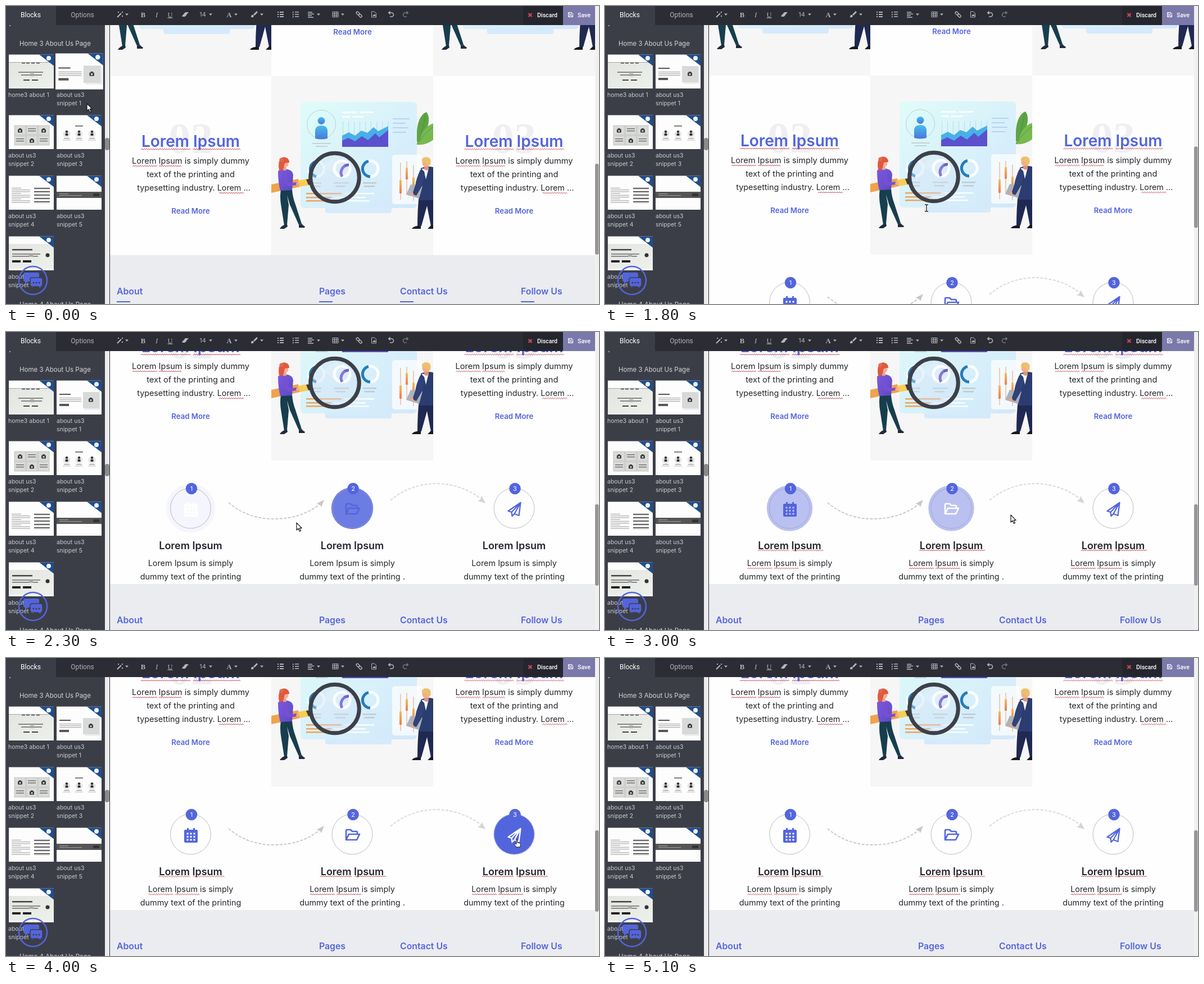
Write an HTML page that moves like this. It is 1055x531 px and loops after 5.4 s.

```html
<!DOCTYPE html>
<html lang="en">
<head>
<meta charset="utf-8">
<title>Snippet editor</title>
<style>
html,body{margin:0;width:100%;height:100%;overflow:hidden;background:#fff}
svg{display:block;font-family:Inter,"Open Sans",sans-serif}
.ui{font-family:Roboto,Inter,sans-serif}
</style>
</head>
<body>
<svg id="stage" width="1055" height="531" viewBox="0 0 1055 531"></svg>
<script>
const BLUE = '#5365dd', SIDE = '#3c3e47', BAR = '#2b2c34', INK = '#25262c', LOOP = 5400;
const stage = document.getElementById('stage');

// Markup helpers
const rect = (x, y, w, h, fill, more = '') => `<rect x="${x}" y="${y}" width="${w}" height="${h}" fill="${fill}" ${more}/>`;
const disc = (x, y, r, fill, more = '') => `<circle cx="${x}" cy="${y}" r="${r}" fill="${fill}" ${more}/>`;
const shape = (d, fill, more = '') => `<path d="${d}" fill="${fill}" ${more}/>`;
const line = (d, color, w = 1, more = '') => `<path d="${d}" fill="none" stroke="${color}" stroke-width="${w}" ${more}/>`;
const group = (body, more = '') => `<g ${more}>${body}</g>`;
const at = (x, y, body, more = '') => group(body, `transform="translate(${x} ${y})" ${more}`);
const text = (x, y, s, size, fill = INK, more = '') => `<text x="${x}" y="${y}" font-size="${size}" fill="${fill}" ${more}>${s}</text>`;
const mid = (x, y, s, size, fill = INK, weight = 400, more = '') => text(x, y, s, size, fill, `text-anchor="middle" font-weight="${weight}" ${more}`);
const wave = (x1, x2, y) => line(`M${x1} ${y}` + 'l2 -1.8 2 1.8'.repeat(Math.round((x2 - x1) / 4)), '#c8444f', 1);
const bars = (list, fill, h = 2) => list.map(([x, y, w]) => rect(x, y, w, h, fill)).join('');

const defs = `<defs>
<linearGradient id="panel" x1="0" y1="0" x2="1" y2="1"><stop stop-color="#dffcf9"/><stop offset="1" stop-color="#d2e7fb"/></linearGradient>
<linearGradient id="user" x1="0" y1="0" x2="0" y2="1"><stop stop-color="#49bdec"/><stop offset="1" stop-color="#4a78dd"/></linearGradient>
<linearGradient id="warm" x1="0" y1="0" x2="0" y2="1"><stop stop-color="#f6bd5a"/><stop offset="1" stop-color="#ee7a4e"/></linearGradient>
<linearGradient id="shirt" x1="0" y1="0" x2="1" y2="1"><stop stop-color="#7f58dc"/><stop offset="1" stop-color="#5a49c4"/></linearGradient>
<linearGradient id="soft" x1="0" y1="0" x2="1" y2="1"><stop stop-color="#e3e5e1"/><stop offset="1" stop-color="#eef0ec"/></linearGradient>
<clipPath id="cell"><rect x="472" y="125" width="288" height="319"/></clipPath>
<clipPath id="view"><rect x="185" y="34" width="863" height="497"/></clipPath>
<clipPath id="list"><rect y="34" width="176" height="497"/></clipPath>
</defs>`;

// Illustration
const gauge = (x, y, arc, color) => disc(x, y, 14, 'none', 'stroke="#fafdff" stroke-width="5"') +
  line(`M${x} ${y + 14}A14 14 0 0 1 ${x + arc[0]} ${y + arc[1]}`, color, 5);
const candle = (x, y1, y2, b, h) => rect(x - .5, y1, 1, y2 - y1, '#e8a070') + rect(x - 2, b, 4, h, 'url(#warm)', 'rx="1"');
const dashboard = rect(568, 350, 118, 19, '#d5eafb', 'rx="4"') + rect(524, 171, 207, 189, 'url(#panel)', 'rx="7"') +
  disc(561, 211, 25.5, 'none', 'stroke="#bccfd2"') + disc(561, 204.5, 6.5, 'url(#user)') +
  shape('M550 236V223q0 -10 11 -10t11 10v13q-11 3 -22 0z', 'url(#user)') +
  bars([[545, 244, 33], [551, 249, 21]], '#c5d1d5') +
  bars([[598, 188, 27], [629, 188, 26], [598, 196, 14], [616, 196, 20]], '#fbfeff', 3) +
  [...Array(9)].map((_, i) => rect(599 + i * 10, 206, 1, 44, '#b4ddec')).join('') +
  shape('M598 231l12 -6 11 6 11 -9 11 4 11 -10 8 7 18 -9v37h-82z', '#48b0e8') +
  shape('M598 240l11 -5 12 6 12 -9 11 7 13 -12 7 7 16 -13v30h-82z', '#5b50ce') +
  bars([[688, 200, 30], [688, 208, 23], [688, 216, 28], [688, 224, 24]], '#b9d2f6') +
  gauge(552, 290, [3, -13.6], '#2783c4') + gauge(648, 290, [-3, -13.6], '#247dbd') +
  bars([[540, 314, 21], [543, 320, 17], [583, 314, 27], [586, 320, 18], [635, 314, 24], [637, 320, 19]], '#bfcbd2', 2.5) +
  bars([[534, 333, 63], [534, 340, 45], [534, 346, 57]], '#f0a15c', 2.5) +
  bars([[602, 333, 53], [583, 340, 57], [596, 346, 50]], '#fafdff', 2.5);
const plant = shape('M731 243C729 214 735 194 748 189C758 201 749 229 731 243z', '#5da445') +
  shape('M731 247C739 223 749 211 765 208L763 236Q749 249 731 247z', '#78b94f') +
  line('M731 247Q741 230 746 193M731 247Q744 226 762 214', '#448c3c', .8);
const woman = shape('M472 318l48 -10 3 14 -51 11z', '#f0a34c') + shape('M519 311l17 -3 4 11 -17 3z', '#f8cc55') +
  shape('M534 309l6 -1 3 9 -5 2z', '#393b42') +
  shape('M489 327h20q1 14 6 27l11 34 -5 2 -16 -36 -5 -17 3 17 -3 36 -5 1 -6 -38q-2 -13 0 -26z', '#173e4e') +
  shape('M495 390l5 -1 1 4 -6 4h-8q2 -4 8 -7zM521 390l5 -2q3 4 6 5l-1 2h-10z', '#222a3d') +
  shape('M484 294q8 -5 17 -3 9 2 10 10l-2 27 -21 1q-4 -14 -4 -35z', 'url(#shirt)') +
  shape('M500 299q5 7 1 13l9 3 7 -1v5l-14 2q-9 -3 -10 -9z', '#7650d2') + disc(519, 317, 2.8, '#f3ab8e') +
  shape('M493 285h5l1 8h-6z', '#f1a184') + disc(497, 282, 5.3, '#f4b194') +
  shape('M486 293q-3 -15 3 -21 3 -4 9 -2 6 2 6 9l-8 1 -2 9q-3 5 -8 4z', '#df593f') + disc(490, 274, 3.6, '#e8684a');
const man = rect(687, 265, 54, 88, '#fff', 'rx="5" opacity=".72"') + candle(702, 279, 345, 310, 24) + candle(713, 277, 336, 288, 21) + candle(725, 284, 347, 305, 26) +
  shape('M735 335h27l1 57h-7l-7 -36 -10 36h-7q0 -30 3 -57z', '#1f2951') +
  shape('M731 392h7v5h-16q2 -4 9 -5zM756 391h6v6h-12z', '#17191f') +
  shape('M738 289q13 -6 27 0v57h-31z', '#2b3c70') + shape('M739 290l5 5 3 14 5 -20z', '#f4f6f8') +
  shape('M720 318l21 3 -6 22 -23 -7z', '#adb2ba') + shape('M737 292q-7 15 -9 28l-5 15 7 3 10 -17 5 -20z', '#304277') +
  disc(722, 335, 3, '#efa386') + shape('M744 282h8v10q-5 2 -8 -1z', '#df9275') + disc(747, 280, 6.5, '#f1ad8d') +
  shape('M740 277q-1 -8 8 -8 10 1 7 13l-4 4 -3 -7z', '#edc06c');
const lens = disc(585, 305.5, 42, '#d3e2f6', 'opacity=".4"') + gauge(598, 290, [12, -7], '#745fd0') +
  shape('M563 287q10 -15 27 -19l24 32 -8 9z', '#fff', 'opacity=".15"') +
  disc(585, 305.5, 43.3, 'none', 'stroke="#3d4048" stroke-width="7"');
const art = group(rect(472, 125, 288, 319, '#f6f6f6') + plant + dashboard + man + lens + woman, 'id="art" clip-path="url(#cell)"');
const artCopy = dx => `<use href="#art" x="${dx}" y="-319"/>`;

// Page
const readMore = (x, y) => mid(x, y, 'Read More', 13.2, BLUE, 600);
const article = (dx, n) => at(dx, 0,
  mid(328.5, 262, n, 79, '#efeff3', 700, 'font-family="Liberation Serif,serif"') +
  mid(328.5, 251, 'Lorem Ipsum', 28, BLUE, 600) + wave(240, 326, 256) + wave(333, 417, 256) +
  mid(328.5, 281, 'Lorem Ipsum is simply dummy', 14.6) + wave(225, 267, 286) + wave(272, 313, 286) +
  mid(328.5, 305, 'text of the printing and', 14.6) +
  mid(334, 329, 'typesetting industry. Lorem ...', 14.3) + wave(379, 421, 334) + readMore(328.5, 370));
const rows = rect(185, -200, 863, 1200, '#fefefe') + art + artCopy(-288) + artCopy(288) + readMore(616.5, 51) + article(0, '02') + article(575.5, '03');

const icons = [
  shape('M-12 -7q0 -2 2 -2h3v-3h3v3h8v-3h3v3h3q2 0 2 2v19q0 2 -2 2h-20q-2 0 -2 -2z', 'currentColor') +
    [-7.5, -1.5, 4.5].map(x => [-3.5, 2, 7.5].map(y => rect(x, y, 3, 3, 'var(--back)')).join('')).join(''),
  line('M-11.5 9V-7q0 -2 2 -2h6l3 3h7q2 0 2 2v3M-11.5 9l5 -10h19l-5 10z', 'currentColor', 2.6, 'stroke-linejoin="round"'),
  line('M11 -11L-11 4l6 2 1 7 4 -4 8 3zM11 -11L-5 6M11 -11L0 9', 'currentColor', 2.3, 'stroke-linejoin="round"')
];
const step = (cx, i) => at(cx, 314,
  disc(0, 0, 36, '#fefefe', 'stroke="#c6c6ca"') + disc(0, 0, 36, BLUE, `id="fill${i}"`) +
  disc(0, 0, 35.5, 'none', 'stroke="#c6c6ca" stroke-width=".6" opacity=".6"') +
  at(.5, 1, icons[i], `id="icon${i}"`) + disc(1.5, -35, 10.3, BLUE) + mid(1.5, -31, i + 1, 11, '#fff') +
  mid(0, 73, 'Lorem Ipsum', 18, INK, 600) + mid(0, 103, 'Lorem Ipsum is simply', 14.4) +
  mid(0, 127, 'dummy text of the printing' + (i === 1 ? ' .' : ''), 14.4) +
  group(wave(-57, -1, 76) + wave(4, 58, 76) + wave(-75, -33, 108) + wave(-28, 14, 108), 'class="spell"'));
const steps = at(0, 215, rect(185, 229, 863, 220, '#fefefe') +
  line('M396 304Q430 333 476 333Q526 333 559 306', '#cbcbcd', 2, 'stroke-dasharray="5 2.5"') + shape('M566 299l-5 13 -3 -5 -6 -1z', '#c8c8ca') +
  line('M684 300Q718 271 765 270Q812 271 846 298', '#dadadc', 2, 'stroke-dasharray="5 2.5"') + shape('M853 305l-14 -4 6 -3 1 -6z', '#d4d4d6') +
  [328.5, 616, 904].map(step).join(''), 'id="steps"');
const footer = group(rect(185, 444, 863, 300, '#ebecf0') +
  [[197, 'About'], [557, 'Pages'], [701, 'Contact Us'], [916, 'Follow Us']].map(([x, s]) =>
    text(x, 514, s, 15.8, BLUE, 'font-weight="600"') + rect(x, 526, 24, 2, BLUE)).join(''), 'id="footer"');
const dropZone = rect(185, 432, 863, 24, '#b9bdd8', 'id="zone" fill-opacity=".45" stroke="#a9aec0" stroke-width="1.5" stroke-dasharray="6 4"');

// Sidebar thumbnails, each 80 by 60
const camera = (x, y) => rect(x - 4, y - 2.5, 8, 6, '#3d3d3d', 'rx="1"') + rect(x - 2, y - 4, 4, 2, '#3d3d3d') + disc(x, y + .5, 1.6, '#ddd');
const person = x => disc(x, 33, 6.5, '#e6e6e6') + disc(x, 29, 2.2, '#333') + rect(x - 2.5, 32, 5, 4, '#333', 'rx="1"') +
  bars([[x - 5, 40.5, 10]], '#777', 1) + bars([[x - 7, 43.5, 14]], '#aaa', .8);
const thumbs = [
  rect(0, 13, 80, 47, 'url(#soft)') + rect(0, 13, 80, 1, '#a5a5a5') + bars([[23, 14, 6], [31, 14, 6], [40, 14, 6], [49, 14, 6]], '#555', 1.5) +
    bars([[17, 30, 44], [22, 35, 37]], '#888', 2) + rect(38, 33, 7, 5, '#aaa') + bars([[26, 44, 11], [41, 44, 11]], '#444'),
  bars([[5, 23, 20]], '#555') + bars([[5, 30, 39], [5, 33, 39], [5, 36, 39]], '#aaa', 1.2) + rect(5, 41, 17, 4, '#555') +
    rect(50, 23, 29, 29, '#eee') + rect(47, 20, 29, 29, '#d8dada') + camera(61, 34),
  [0, 1, 2].map(i => [0, 1].map(j => rect(10 + i * 21, 18 + j * 18, 20, 17, '#d9dbd8', 'stroke="#a7a7a7" stroke-width=".6"') +
    ((i + j) % 2 ? bars([[13 + i * 21, 23 + j * 18, 14], [13 + i * 21, 27 + j * 18, 14]], '#666', 1.3) : camera(20 + i * 21, 27 + j * 18))).join('')).join(''),
  rect(33, 18, 14, 1.5, '#555') + [18, 40, 63].map(person).join(''),
  [...Array(9)].map((_, i) => rect(5, 21 + i * 3.2, i % 3 ? 33 : 17, 1, '#999')).join('') +
    [0, 1, 2, 3, 4].map(i => rect(45, 21 + i * 6, 28, 1.6, '#333') + rect(45, 24 + i * 6, 28, .8, '#ccc')).join(''),
  rect(0, 28, 80, 11, '#555') + bars([[5, 31, 16], [5, 34, 40]], '#999', 1.2) + rect(65, 31, 11, 5, '#333'),
  rect(0, 13, 80, 44, 'url(#soft)') + bars([[6, 22, 36]], '#444', 2.5) + bars([[6, 30, 50], [6, 34, 46]], '#888', 2) + rect(36, 31, 7, 5, '#aaa') +
    rect(6, 42, 15, 4, '#222') + rect(25, 42, 15, 4, '#222') + disc(69, 33, 3.5, '#333')
];
const thumb = i => rect(0, -.5, 80, 60.5, '#fdfdfd') + thumbs[i] + shape('M54 -.5h26v20z', '#1e4d8e') + disc(71, 6, 4, '#f4f7fb');
const block = (_, i) => {
  const x = i % 2 ? 90 : 5, y = 87 + 108 * (i >> 1), words = i ? ['about us3', 'snippet ' + i] : ['home3 about 1'];
  return at(x, y, thumb(i), `id="thumb${i}"`) + words.map((w, k) => text(i % 2 ? 90 : 4, y + 75 + k * 14.5, w, 10.5, '#c9cacf')).join('');
};
const chat = disc(48, 489, 25, 'none', `stroke="${BLUE}" stroke-width="2.5"`) +
  shape('M34 475h22q3 0 3 3v9q0 4 -3 4H39l-5 5v-5q-3 0 -3 -4v-9q0 -3 3 -3z', BLUE) +
  shape('M46 484h16q3 0 3 3v9q0 4 -3 4l1 4 -6 -4H46q-3 0 -3 -4v-9q0 -3 3 -3z', BLUE, `stroke="${SIDE}" stroke-width="1.5"`) +
  [49, 54, 59].map(x => disc(x, 493, 1.5, SIDE)).join('');
const sidebar = rect(0, 34, 176, 497, SIDE) +
  group(rect(6, 34, 2, 2, '#aaa') + text(24, 71, 'Home 3 About Us Page', 11.5, '#d4d5d9') + text(24, 536, 'Home 4 About Us Page', 11.5, '#d4d5d9') +
  thumbs.map(block).join('') + chat, 'clip-path="url(#list)"') +
  rect(176, 34, 8, 497, '#ececee') + rect(176, 235, 8, 22, '#8b8b8d', 'rx="4"') + rect(184, 34, 1, 497, '#2b2c34');

// Toolbar
const GREY = '#b4b5bb';
const caret = x => shape(`M${x - 3} 13.5h6l-3 3.5z`, GREY);
const letter = (x, s, more) => mid(x, 19.5, s, 12.5, GREY, 400, `font-family="Liberation Serif,serif" ${more}`);
const rowsIcon = (x, widths) => widths.map((w, i) => rect(x, 10.5 + i * 3, w, 1.5, GREY)).join('');
const turn = (x, flip, color) => group(line('M-2.5 -3H1a3.5 3.5 0 0 1 0 7h-3', color, 1.6) + shape('M-5.5 -3l4 -3.5v7z', color),
  `transform="translate(${x} 15) scale(${flip} 1)"`);
const toolbar = rect(0, 0, 1048, 34, BAR) + rect(0, 0, 89, 34, SIDE) +
  group(mid(44, 20, 'Blocks', 12, '#fff') + mid(136, 20, 'Options', 12, '#b3b4ba'), 'class="ui"') +
  line('M198 20l7 -7', GREY, 2.2) + bars([[206, 10, 2], [199, 10, 2], [206, 17, 2]], GREY) +
  letter(244, 'B', 'style="font-weight:700"') + letter(268, 'I', 'font-style="italic"') + letter(292, 'U', 'text-decoration="underline"') +
  shape('M313 18l6 -7h6l-6 7z', GREY) + line('M313.5 18.5h5l2 -2.5', GREY) +
  mid(350, 19, '14', 11, GREY) + letter(397, 'A', 'style="font-weight:700"') +
  shape('M440 15l6 -6 2 2 -6 6zM436 20q0 -5 4 -4l1 2q-1 3 -5 2z', GREY) +
  [0, 4, 8].map(d => rect(483, 10 + d, 2, 2, GREY) + rect(487, 10 + d, 7, 2, GREY) + rect(510, 10 + d, 1.5, 2.5, GREY) + rect(514, 10 + d, 7, 1.5, GREY)).join('') +
  rowsIcon(537, [8, 11, 7, 10]) + line('M581 10.5h10v9h-10zM581 13.5h10M581 16.5h10M584.5 11v9M588 11v9', GREY) +
  group(['-6', '0'].map(x => rect(x, -2, 6.5, 4, 'none', `rx="2" stroke="${GREY}" stroke-width="1.4"`)).join(''), 'transform="translate(628 15) rotate(45)"') +
  line('M650.5 10h5l3 3v7h-8z', GREY) + shape('M652 18l2 -3 1 1 1 -2 2 4z', GREY) +
  turn(685, 1, GREY) + turn(711, -1, '#73747b') + [215, 364, 409, 455, 556, 599].map(caret).join('') +
  rect(920, 0, 71, 34, '#25262d') + rect(991, 0, 57, 34, '#7b78aa') +
  line('M929.5 13l6 6m0 -6l-6 6', '#c9485b', 2.4) +
  group(text(945, 20, 'Discard', 10.6, '#fff', 'font-weight="500"') + text(1017, 20, 'Save', 10.6, '#fff', 'font-weight="500"'), 'class="ui"') +
  line('M1000.5 11.5h6l2 2v6h-8zM1002 12v3h4v-3M1002 19.5v-2.5h5v2.5', '#fff');

const ghost = rect(0, 0, 81, 99, SIDE) + rect(0, 0, 81, 62, '#fdfdfd', 'stroke="#d8d8dc" stroke-width=".6"') + at(.5, .5, thumb(3)) +
  text(4, 77, 'about us3', 10.5, '#d0d1d6') + text(4, 92, 'snippet 3', 10.5, '#d0d1d6');
const outline = 'stroke="#16171a" stroke-linejoin="round"';
const beam = 'M-3 -6h2l1 1 1 -1h2M-3 6h2l1 -1 1 1h2M0 -5v10';
const pointers = {
  arrow: shape('M0 0v13l3 -2.8 2.3 5 2.2 -1 -2.3 -4.8h4z', '#fff', outline + ' stroke-width="1.2"'),
  grab: shape('M-5 0q0 -3 2 -3 0 -2 2.5 -1.5 2 -1.5 3 .3 2 -.5 2.5 1.5 2 0 1 4l-1 3h-7z', '#fff', outline + ' stroke-width="1.3"'),
  beam: line(beam, '#fff', 3.4) + line(beam, '#222', 1.4),
  hand: shape('M-1 0q2 -1 2 1v4l5 1q1 1 .5 4l-1.5 3h-6l-4 -5q0 -2 2 -1l2 1z', '#fff', outline)
};

stage.innerHTML = defs + group(group(rows + steps + footer + dropZone, 'id="scroll"'), 'clip-path="url(#view)"') +
  rect(1048, 0, 7, 531, '#f0f0f1') + rect(1048, 281, 6.5, 162, '#96969a', 'id="bar" rx="3"') +
  sidebar + toolbar + group(ghost, 'id="ghost"') + group('', 'id="pointer"');

// Motion: [time, ...values], linear between keys
const path = [[0, 144, 174], [300, 132, 222], [400, 132, 222], [1000, 438, 352], [1200, 646, 474], [1300, 646, 474],
  [1500, 572, 368], [1600, 572, 368], [1700, 572, 360], [2000, 572, 360], [2300, 517, 340], [2500, 615, 322], [2800, 618, 322],
  [3000, 722, 326], [3400, 905, 328], [3500, 905, 328], [4000, 909, 324], [4100, 909, 324], [4600, 256, 69], [4700, 256, 69], [4900, 86, 20]];
const scrollKeys = [[1600, 0], [1700, 1], [1800, 1], [1900, 20], [2000, 90], [2100, 170], [2200, 208], [2300, 215]];
const modes = [[0, 'arrow'], [300, 'grab'], [1200, 'beam'], [2100, 'arrow'], [2500, 'hand'], [2900, 'arrow'], [3300, 'hand'], [4200, 'arrow']];
// [circle, start, length, icon colour]
const pulses = [[0, 1920, 400, '#fff'], [1, 2240, 400, BLUE], [0, 2880, 200, BLUE], [1, 2880, 200, '#fff'], [2, 4180, 400, '#fff']];
const held = [[1, 2500, 2880], [2, 3300, 4180]];

function sample(keys, t) {
  const i = keys.findIndex(k => k[0] > t);
  if (i < 0) return keys[keys.length - 1].slice(1);
  if (!i) return keys[0].slice(1);
  const a = keys[i - 1], b = keys[i], p = (t - a[0]) / (b[0] - a[0]);
  return a.slice(1).map((v, k) => v + (b[k + 1] - v) * p);
}
const $ = id => document.getElementById(id);
const show = (node, on) => { node.style.display = on ? '' : 'none'; };
const move = (node, x, y) => node.setAttribute('transform', `translate(${x} ${y})`);
const tint = alpha => `rgb(${[83, 101, 221].map(c => 254 - (254 - c) * alpha)})`;

function circleState(i, t) {
  if (held.some(([c, a, b]) => c === i && t >= a && t < b)) return [36, 1, '#fff'];
  const hit = pulses.find(([c, a, d]) => c === i && t >= a && t < a + d);
  if (!hit) return [36, 0, BLUE];
  const p = (t - hit[1]) / hit[2];
  return [36 + 8 * p, 1 - p, hit[3]];
}

function draw(ms) {
  const t = Math.floor(ms % LOOP / 100) * 100;
  const [x, y] = sample(path, t), [top] = sample(scrollKeys, t);
  const dropped = t >= 1200, dragging = t >= 500 && !dropped;

  move($('scroll'), 0, -Math.round(top));
  move($('footer'), 0, dropped ? 220 : 0);
  show($('steps'), dropped);
  show($('zone'), dragging);
  show($('ghost'), dragging);
  move($('ghost'), x + 6, y + 1);
  $('bar').setAttribute('y', dropped ? 250 + 57 * top / 215 : 281);
  $('bar').setAttribute('height', dropped ? 145 : 162);

  for (const [i, left, up, on] of [[1, 90, 87, t < 100], [3, 90, 195, t >= 200 && t < 500]])
    $('thumb' + i).setAttribute('transform', on ? `translate(${left - 2} ${up - 2}) scale(1.06)` : `translate(${left} ${up})`);

  for (let i = 0; i < 3; i++) {
    const [r, alpha, ink] = circleState(i, t);
    $('fill' + i).setAttribute('r', r);
    $('fill' + i).setAttribute('opacity', alpha);
    $('icon' + i).style.color = ink;
    $('icon' + i).style.setProperty('--back', tint(alpha));
  }
  document.querySelectorAll('.spell').forEach(n => show(n, t >= 2600));

  const pointer = $('pointer'), mode = modes.filter(m => m[0] <= t).pop()[1];
  if (pointer.dataset.mode !== mode) {
    pointer.dataset.mode = mode;
    pointer.innerHTML = pointers[mode];
  }
  move(pointer, x, y);
  show(pointer, t < 5100);
}

const start = performance.now();
(function tick() {
  draw(performance.now() - start);
  requestAnimationFrame(tick);
})();
</script>
</body>
</html>
```
